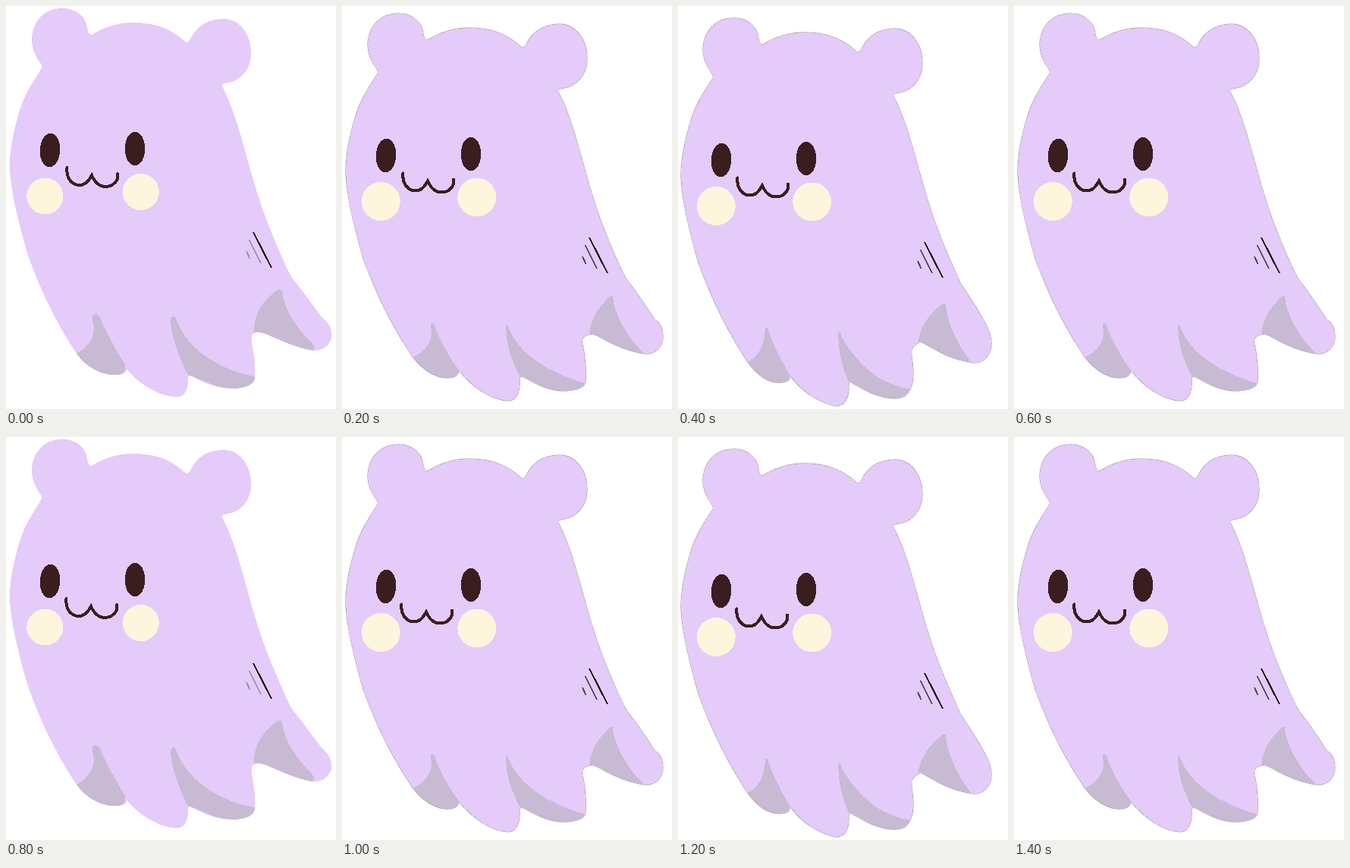
Animation, 435 px wide and 531 px high, one loop 1600 ms. Source, as an HTML page:

```html
<!DOCTYPE html>
<html lang="en">
<head>
<meta charset="utf-8">
<title>Floating ghost</title>
<style>
html, body { margin: 0; width: 100%; height: 100%; overflow: hidden; background: #fff; }
svg { display: block; width: 100%; height: 100%; shape-rendering: crispEdges; }
.body { fill: #e4cbfa; }
.shade { fill: #c8bad2; }
.eyes { fill: #3a1d1f; }
.cheeks { fill: #fef5dd; }
.mouth { fill: none; stroke: #3a1d1f; stroke-width: 4; stroke-linecap: round; }
.marks { stroke-width: 2; }
#rim { stroke-width: 1.4; shape-rendering: auto; }
</style>
</head>
<body>
<svg viewBox="0 0 435 531">
  <g id="rim">
    <use href="#tail"/>
    <use id="headRim" href="#skull"/>
  </g>
  <path id="tail" class="body"/>
  <path id="shade" class="shade"/>
  <g id="head">
    <path id="skull" class="body" d="M47 78C45 72 34 64 34 42C36 18 52 3 74 3C94 3 106 16 107 30Q108 38 113 38
      C130 27 150 22 165 22C195 22 215 28 236 47Q240 50 243 44
      C250 28 265 17 287 17C310 17 323 40 323 62C323 85 308 99 292 101Q281 102 286 108
      C305 145 315 195 330 243C338 270 350 300 362 327L28 325C18 290 6 245 5 212
      C5 195 8 170 19 135C25 115 36 100 47 82Q48 80 47 78Z"/>
    <g class="eyes">
      <ellipse cx="58" cy="190" rx="13.3" ry="22.3" transform="rotate(3 58 190)"/>
      <ellipse cx="170" cy="188" rx="13.3" ry="22.3"/>
    </g>
    <g class="cheeks">
      <circle cx="51.3" cy="250.5"/>
      <circle cx="177.8" cy="245"/>
    </g>
    <path id="mouth" class="mouth" d="M80.500 213C79 228 88 236 97 236C105 236 110 229 113 223C117 232 123 238 131 238C141 238 149 230 147 221"/>
    <g class="marks">
      <path stroke="#111" d="M326 298L350 345"/>
      <path id="minor" d="M320.500 308L336 339M317 323L321.500 333"/>
    </g>
  </g>
</svg>
<script>
const poses = [
  {
    x: 0, y: 0, cheek: 24, mouthY: 0, minor: '#a590b5', rim: 'none',
    tail: `M362 327C370 345 375 358 383 366C395 381 408 400 418 412Q429 420 429 433
      C429 446 418 454 405 454C385 451 360 440 345 433C338 430 330 429 327 431Q322 433 324 445
      C327 462 330 480 327 491C322 503 300 505 285 503C268 500 253 492 243 487Q240 485 240 492
      C240 505 235 515 226 515C200 515 172 495 159 478Q158 486 145 486
      C125 487 105 475 93 458C60 408 40 360 28 325L200 300Z`,
    shade: `M93 458C107 450 116 440 116 425Q114 415 114 408Q118 404 123 409C132 430 146 455 157 473
      Q159 486 145 486C125 487 105 475 93 458Z
      M240 486C230 470 216 430 217 411Q220 407 224 411C228 425 240 446 265 463
      C285 477 310 486 328 488Q328 503 300 504C275 504 258 491 240 486Z
      M327 431C326 410 335 390 358 374Q363 372 364 376C366 400 385 427 405 446Q407 450 404 454
      C385 451 360 440 345 433Q332 428 327 431Z`
  },
  {
    x: 0, y: 7, cheek: 25.5, mouthY: 0.5, minor: '#544d58', rim: '#b5a8ae',
    tail: `M362 334C368 346 372 358 379 366C392 382 404 401 412 413Q423 420 423 435
      C423 450 412 459 400 458C378 456 355 445 338 435Q331 431 325 433Q314 436 317 446
      C320 460 322 478 321 494Q320 507 290 507C270 506 253 496 240 489Q233 486 234 493
      C235 508 230 520 219 520C195 519 170 500 154 480Q153 490 138 490
      C120 489 105 477 94 463C63 418 41 368 28 332L200 300Z`,
    shade: `M94 463C110 455 118 443 118 432L117 418H121C128 440 143 465 154 480
      Q153 490 138 490C120 489 105 477 94 463Z
      M234 487C222 465 215 440 216 418Q222 428 226 437C240 458 262 475 285 484
      Q305 493 321 497Q318 507 290 507C270 506 253 496 234 487Z
      M326 432C328 410 340 395 354 382H357C358 405 375 435 397 457
      C378 456 355 445 338 435Q331 431 326 432Z`
  },
  {
    x: -1, y: 13, cheek: 25.5, mouthY: 0.5, minor: '#544d58', rim: '#b5a8ae',
    tail: `M361 340C367 352 369 361 374 368C386 386 398 405 407 422Q413 433 413 446
      C412 462 402 470 390 470C365 467 345 457 322 443Q316 441 308 452Q307 458 309 470
      C311 485 310 500 304 508Q300 517 285 517C262 516 245 506 230 496Q224 493 225 503
      C225 518 219 527 208 527C185 522 163 508 148 487Q147 496 135 496
      C118 497 103 484 92 469C62 424 40 374 27 338L200 300Z`,
    shade: `M92 469C108 460 114 447 115 424H118C124 445 136 466 147 486
      Q147 496 135 496C118 497 103 484 92 469Z
      M225 495C215 475 211 450 211 430L214 431C220 448 240 472 260 487
      Q282 501 307 505Q300 517 285 517C262 516 245 506 225 495Z
      M316 442C320 420 333 404 349 392H353C354 415 366 442 386 469
      C365 467 345 457 322 443Q319 441 316 442Z`
  }
];
const order = [0, 1, 2, 1, 0, 1, 2, 1];
const mouthX = [0, 0, -1, -1, -1, -2, -2, -1];
const STEP = 200;

const $ = id => document.getElementById(id);
const move = (id, x, y) => $(id).setAttribute('transform', `translate(${x} ${y})`);
const cheeks = document.querySelectorAll('.cheeks circle');
let shown = -1;

function draw(step) {
  const p = poses[order[step]];
  $('tail').setAttribute('d', p.tail);
  $('shade').setAttribute('d', p.shade);
  $('rim').setAttribute('stroke', p.rim);
  $('minor').setAttribute('stroke', p.minor);
  move('head', p.x, p.y);
  move('headRim', p.x, p.y);
  move('mouth', mouthX[step], p.mouthY);
  cheeks.forEach(c => c.setAttribute('r', p.cheek));
}

function tick() {
  const step = Math.floor(performance.now() / STEP) % order.length;
  if (step !== shown) draw(shown = step);
  requestAnimationFrame(tick);
}
tick();
</script>
</body>
</html>
```
